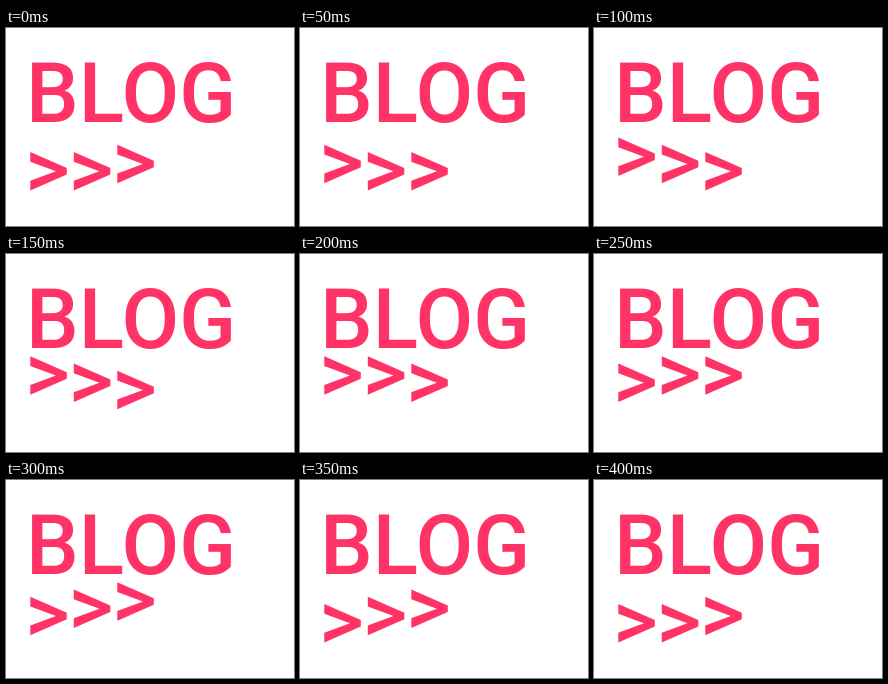
Write an HTML page with a canvas that moves like this. It is 288x198 px and loops after 450 ms.

```html
<!DOCTYPE html>
<html lang="en">
<head>
<meta charset="utf-8">
<title>Blog</title>
<style>
  html, body { margin: 0; width: 100%; height: 100%; overflow: hidden; background: #fff; }
  canvas { display: block; }
</style>
</head>
<body>
<canvas id="stage" width="288" height="198"></canvas>
<script>
const ctx = document.getElementById('stage').getContext('2d');
const PINK = '#ff3366';
const STEP = 50, LOOP = 450;
const TOP = 102.2, RISE = 7.25;
const LEVELS = [3, 2, 1, 0, 0, 1, 2, 3];
const LEFTS = [24.3, 67.8, 111.3];
const CHEVRON = [[0, 0], [36.5, 16], [36.5, 22.6], [0, 38.6], [0, 28.8], [25.6, 19.3], [0, 9.8]];

function drawTitle() {
  ctx.font = '500 83.6px Roboto, sans-serif';
  const inkLeft = ctx.measureText('BLOG').actualBoundingBoxLeft;
  ctx.fillText('BLOG', 26 + inkLeft, 94.3);
}

function drawChevron(left, top) {
  ctx.beginPath();
  for (const [x, y] of CHEVRON) ctx.lineTo(left + x, top + y);
  ctx.fill();
}

function draw(time) {
  const step = Math.floor((time % LOOP) / STEP);
  ctx.fillStyle = '#fff';
  ctx.fillRect(0, 0, 288, 198);
  ctx.fillStyle = PINK;
  drawTitle();
  // Each chevron follows the one to its left, one step later.
  LEFTS.forEach((left, i) => {
    drawChevron(left, TOP + RISE * LEVELS[(step - i + 8) % 8]);
  });
}

const start = performance.now();
function tick() {
  draw(performance.now() - start);
  requestAnimationFrame(tick);
}
tick();
</script>
</body>
</html>
```
